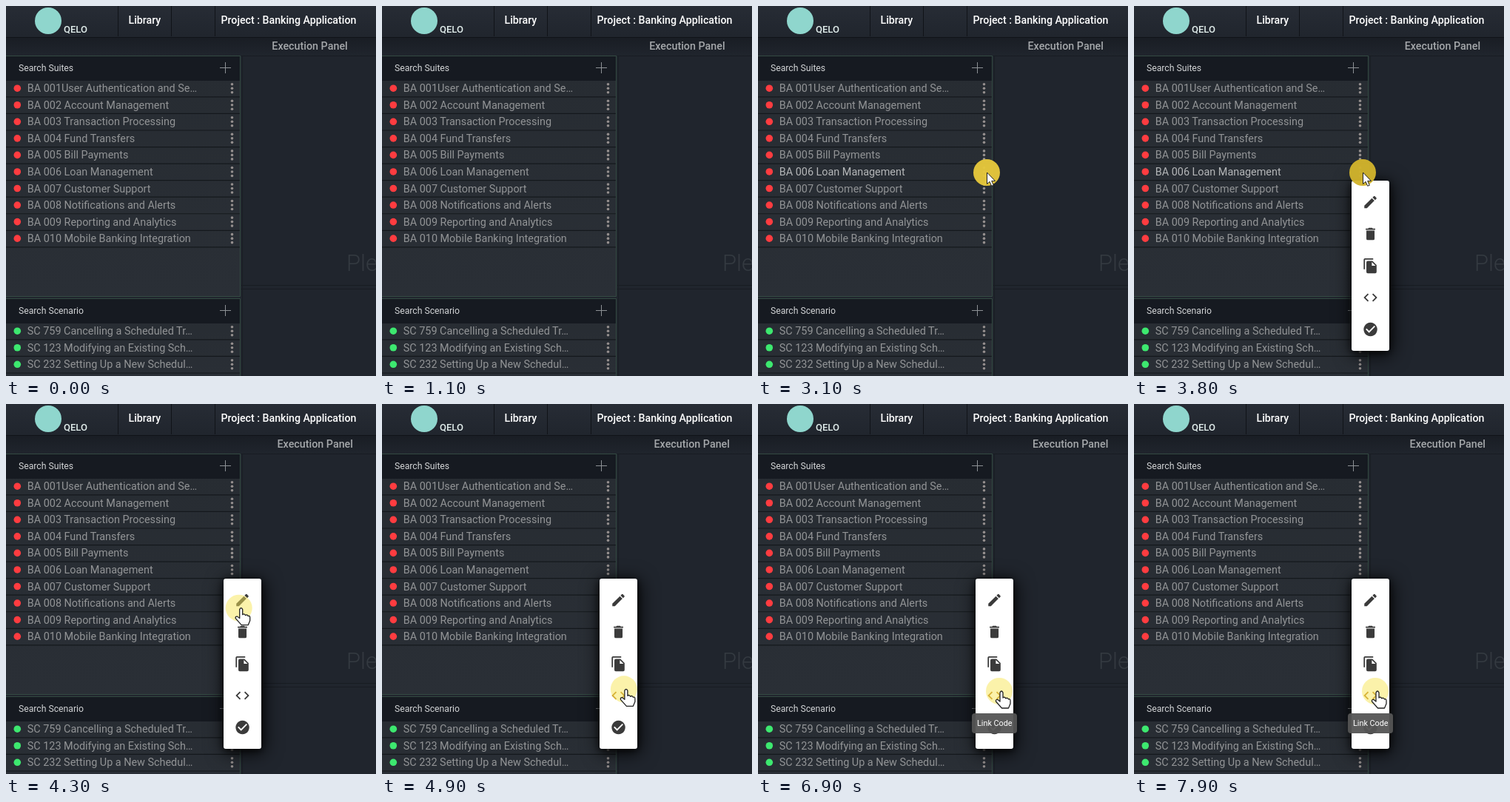
An HTML page for the animation above (8000 ms loop, 500 px wide and 500 px high).

```html
<!DOCTYPE html>
<html lang="en">
<head>
<meta charset="utf-8">
<title>Test suite manager</title>
<style>
  html, body { margin: 0; width: 100%; height: 100%; overflow: hidden; background: #20262d; }
  svg { display: block; width: 100vw; height: 100vh; }
  text { font-family: Roboto, Arial, sans-serif; }
  .row { font-size: 14.4px; fill: #929496; }
  .head { font-size: 12.2px; fill: #d3d5d7; }
  .nav { font-size: 14.2px; font-weight: 500; fill: #fff; }
  #panel { font-size: 14.3px; font-weight: 500; fill: #a5a8ab; }
  #menu > rect { filter: drop-shadow(0 2px 5px #000c) drop-shadow(2px 3px 12px #000d); }
</style>
</head>
<body>
<svg id="stage" viewBox="0 0 500 500">
  <defs>
    <linearGradient id="bar" x2="0" y2="1">
      <stop stop-color="#272c35"/><stop offset="1" stop-color="#20252d"/>
    </linearGradient>
    <linearGradient id="band" x2="0" y2="1">
      <stop stop-color="#191d24"/><stop offset="1" stop-color="#20252d"/>
    </linearGradient>
    <linearGradient id="empty" x2="0" y2="1">
      <stop stop-color="#272c32"/><stop offset="1" stop-color="#2a2f36"/>
    </linearGradient>
  </defs>

  <rect width="500" height="500" fill="#20252d"/>
  <rect width="500" height="42" fill="url(#bar)"/>
  <rect y="42" width="500" height="25" fill="url(#band)"/>
  <path d="M0 42.5H500M151.500 0V41M223.500 0V41M282.500 0V41" stroke="#101318" fill="none"/>
  <circle cx="57" cy="20" r="18" fill="#8fd6cd"/>
  <text x="78" y="36" font-size="13" font-weight="500" fill="#e3efed">QELO</text>
  <text class="nav" x="165.500" y="24">Library</text>
  <text class="nav" x="290.500" y="24">Project : Banking Application</text>
  <text id="panel" y="59.300">Execution Panel</text>

  <path d="M318 67.500H500M318 377.500H500M318 382.500H500" stroke="#181c22" fill="none"/>
  <path d="M319.500 68V500" stroke="#191d23"/>
  <text x="460" y="358" font-size="31" font-weight="300" fill="#343a41">Ple</text>

  <g id="lists"></g>

  <g id="menu">
    <rect x="294" y="236" width="51" height="230" rx="3" fill="#fff"/>
    <g id="icons" fill="#3b3b3b"></g>
  </g>
  <g id="tip">
    <rect x="289" y="418" width="61" height="27" rx="4" fill="#555" fill-opacity=".95"/>
    <text x="296" y="435.300" font-size="10.800" fill="#fff">Link Code</text>
  </g>
  <g id="pointer">
    <circle id="halo" r="18"/>
    <path id="arrow" d="M.5 0V15.500L4 12.300L6.700 18.300L9.300 17.200L6.700 11.400H11.500Z"
      fill="#fff" stroke="#222" stroke-linejoin="round"/>
    <path id="hand" d="M1 2Q3-2 5 2V9Q7 7 9 10Q11 8 12.500 11Q15 10 15 13V17L12.500 23H3.500L-4.500 14Q-5 11-2 11.500L1 14Z"
      fill="#fff" stroke="#222" stroke-width="1.300" stroke-linejoin="round"/>
  </g>
</svg>

<script>
const $ = id => document.getElementById(id);
const LOOP = 8000, STEP = 100, PITCH = 22.55;

const suites = ["BA 001User Authentication and Se…", "BA 002 Account Management",
  "BA 003 Transaction Processing", "BA 004 Fund Transfers", "BA 005 Bill Payments",
  "BA 006 Loan Management", "BA 007 Customer Support", "BA 008 Notifications and Alerts",
  "BA 009 Reporting and Analytics", "BA 010 Mobile Banking Integration"];
const scenarios = ["SC 759 Cancelling a Scheduled Tr…", "SC 123 Modifying an Existing Sch…",
  "SC 232 Setting Up a New Schedul…"];

function row(label, y, color) {
  const dots = [-5.5, 0, 5.5].map(d =>
    `<circle cx="305.5" cy="${y + d}" r="1.8" fill="#958f8e"/>`).join("");
  return `<path d="M0 ${y + 11.7}H316" stroke="#14181c" stroke-width="1.2"/>
    <circle cx="15.3" cy="${y}" r="4.8" fill="${color}"/>
    <text class="row" x="28.8" y="${y + 5}">${label}</text>${dots}`;
}

function list(title, top, height, labels, color) {
  const mid = top + 15.5;
  return `<rect y="${top}" width="316" height="${height}" fill="url(#empty)"/>
    <rect y="${top}" width="316" height="33" fill="#161a21"/>
    <path d="M0 ${top - .5}H316.5V${top + height - .5}H0" fill="none" stroke="#344a42"/>
    <text class="head" x="17" y="${mid + 4.5}">${title}</text>
    <path d="M289 ${mid}h15m-7.5-7.5v15" stroke="#8d9195" fill="none"/>` +
    labels.map((label, i) => row(label, top + 43.2 + i * PITCH, color)).join("");
}

$("lists").innerHTML =
  list("Search Suites", 68, 325, suites, "#ff3c40") +
  list("Search Scenario", 396, 120, scenarios, "#3de86f");

// Edit, delete, copy, code and check, on a 24 unit grid
const icons = [
  "M3 17.2V21h3.8L17.8 9.9l-3.7-3.7zM20.7 7q.6-.7 0-1.4l-2.3-2.3q-.7-.6-1.4 0L15.1 5.1l3.8 3.8z",
  "M6 19q0 2 2 2h8q2 0 2-2V7H6zM19 4h-3.5l-1-1h-5l-1 1H5v2h14z",
  "M16 1H4Q2 1 2 3v14h2V3h12zM15 5l6 6v10q0 2-2 2H8q-2 0-2-2V7q0-2 2-2zM14 12h5.5L14 6.5z",
  "M9.4 16.6L4.8 12l4.6-4.6L8 6l-6 6 6 6zM14.6 16.6l4.6-4.6-4.6-4.6L16 6l6 6-6 6z",
  "M12 2a10 10 0 1 0 .01 0zM10 17l-5-5 1.4-1.4 3.6 3.6 7.6-7.6L19 8z"];
$("icons").innerHTML = icons.map((d, i) =>
  `<path fill-rule="evenodd" d="${d}" transform="translate(308.5,${254 + 43 * i}) scale(.92)"/>`).join("");
const codeIcon = $("icons").children[3];
const hoverRow = document.querySelectorAll(".row")[5];

// Pointer path: time, x, y
const path = [[1500, 525, 370], [2300, 320, 237], [2700, 309, 225],
  [4000, 309, 225], [4800, 327, 385], [5300, 326, 388]];

function pointerAt(t) {
  const i = path.findIndex(p => p[0] > t);
  if (i < 1) return path[i < 0 ? path.length - 1 : 0].slice(1);
  const [t0, x0, y0] = path[i - 1], [t1, x1, y1] = path[i];
  const p = (t - t0) / (t1 - t0), e = p * p * (3 - 2 * p);
  return [x0 + (x1 - x0) * e, y0 + (y1 - y0) * e];
}

const show = (id, on) => $(id).setAttribute("visibility", on ? "visible" : "hidden");

function draw(t) {
  const [x, y] = pointerAt(t);
  const open = t >= 3600, inMenu = open && y > 248, pressed = t >= 3400 && !inMenu;
  $("panel").setAttribute("x", 359.3 + t * .00168);
  $("pointer").setAttribute("transform", `translate(${x},${y})`);
  $("halo").setAttribute("fill", pressed ? "#d2b42c" : inMenu ? "#f7e657" : "#e6c83c");
  $("halo").setAttribute("fill-opacity", inMenu ? .5 : .96);
  show("menu", open);
  show("tip", t >= 5400);
  show("arrow", !inMenu);
  show("hand", inMenu);
  codeIcon.style.fill = y > 375 && open ? "#b9821a" : "";
  hoverRow.style.fill = t >= 2500 && t < 4200 ? "#b4b6b8" : "";
}

const start = performance.now();
function tick() {
  const t = (performance.now() - start) % LOOP;
  draw(Math.floor(t / STEP) * STEP);
  requestAnimationFrame(tick);
}
tick();
</script>
</body>
</html>
```
